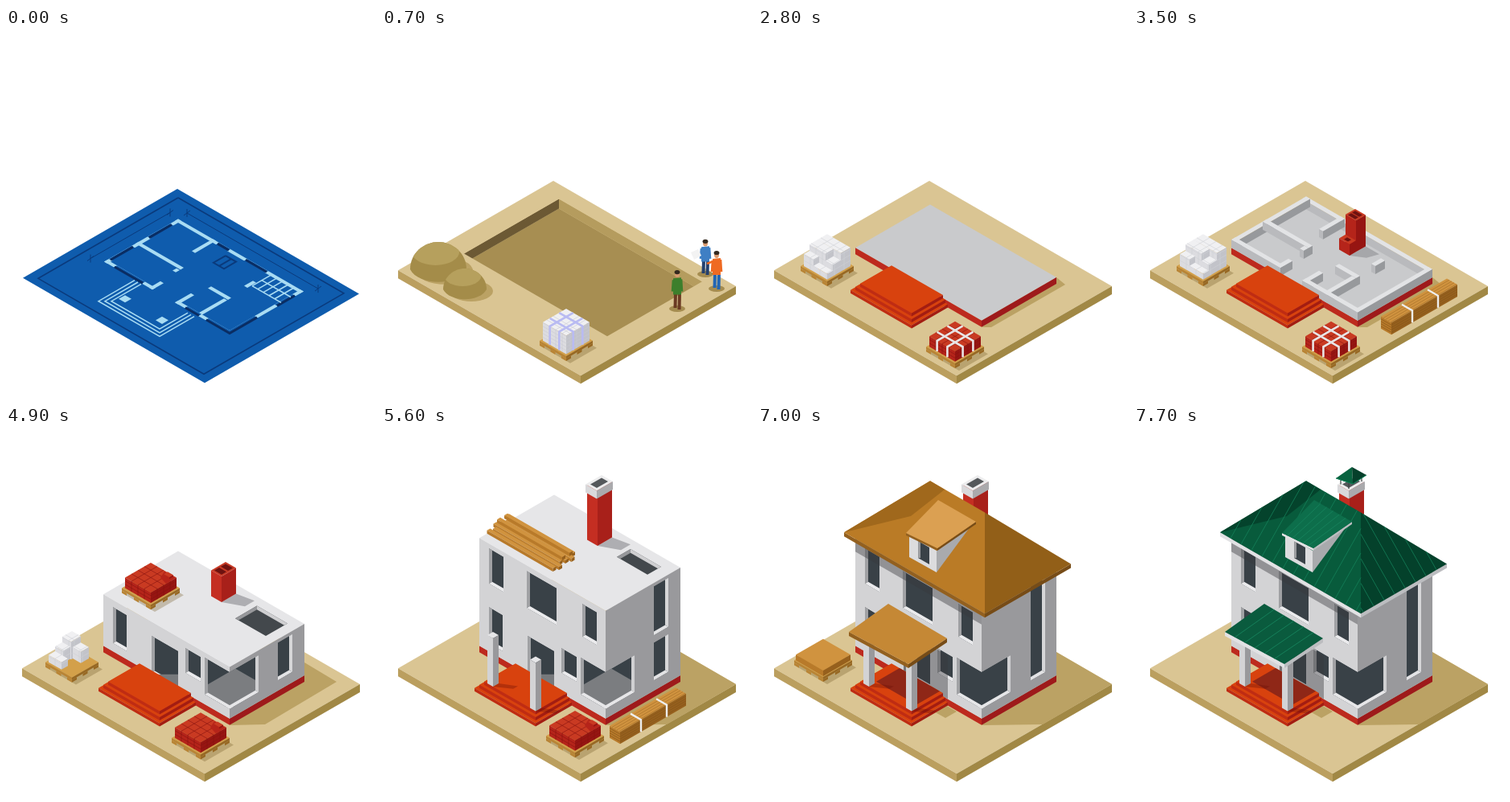
These frames come from a looping animation (460x460 px, 8 s). An HTML page with a canvas:

```html
<!DOCTYPE html>
<html lang="en">
<head>
<meta charset="utf-8">
<title>House construction</title>
<style>
html, body { margin: 0; width: 100%; height: 100%; overflow: hidden; background: #fff; }
canvas { display: block; width: 460px; height: 460px; }
</style>
</head>
<body>
<canvas id="stage" width="460" height="460"></canvas>
<script>
const ctx = document.getElementById('stage').getContext('2d');
const SLOPE = 0.577;

// Isometric point: x runs right-down, y runs left-down, z runs up.
const P = (x, y, z = 0) => [213 + x - y, 190 + (x + y) * SLOPE - z];

// Each palette is [top, left face, right face].
const EARTH = ['#dac593', '#bb9f5f', '#a18845'];
const WHITE = ['#e6e6e8', '#d3d3d5', '#99999c'];
const LOW = ['#e2e3e5', '#b9babd', '#97999c'];
const RED = ['#c93a22', '#b5241a', '#961512'];
const STEP = ['#d8420e', '#bf2c13', '#a31d12'];
const WOOD = ['#d0933f', '#b87a2a', '#96601d'];
const PALLET = ['#d3a04a', '#b98434', '#976823'];
const BRICK = ['#f0f0f2', '#dcdce0', '#c2c3c9'];
const GLASS = '#394147', SHADE = '#bba264';

function trace(pts) {
  ctx.beginPath();
  pts.forEach(p => ctx.lineTo(...p));
}
function poly(color, ...pts) {
  trace(pts);
  ctx.closePath();
  ctx.fillStyle = color;
  ctx.fill();
}
function line(color, width, ...pts) {
  trace(pts);
  ctx.strokeStyle = color;
  ctx.lineWidth = width;
  ctx.stroke();
}
function oval(color, x, y, rx, ry) {
  ctx.beginPath();
  ctx.ellipse(x, y, rx, ry, 0, 0, 7);
  ctx.fillStyle = color;
  ctx.fill();
}
const rect = (color, x0, y0, x1, y1, z = 0) =>
  poly(color, P(x0, y0, z), P(x1, y0, z), P(x1, y1, z), P(x0, y1, z));
const leftFace = (color, x0, x1, y, z0, z1) =>
  poly(color, P(x0, y, z0), P(x1, y, z0), P(x1, y, z1), P(x0, y, z1));
const rightFace = (color, x, y0, y1, z0, z1) =>
  poly(color, P(x, y0, z0), P(x, y1, z0), P(x, y1, z1), P(x, y0, z1));

function box(x0, y0, z0, x1, y1, z1, [top, left, right]) {
  rect(top, x0, y0, x1, y1, z1);
  leftFace(left, x0, x1, y1, z0, z1);
  rightFace(right, x1, y0, y1, z0, z1);
}

// Site
function ground() {
  box(0, 0, -10, 227, 193, 0, EARTH);
}
const lowShadow = () => poly(SHADE, [278, 372], [322, 371], [411, 318], [371, 294]);
const tallShadow = () => poly(SHADE, [278, 372], [354, 371], P(227, 0), [371, 281]);

// Goods
function pallet(x, y, z, s) {
  poly('rgba(110,85,30,.3)', P(x, y, z), P(x + s + 5, y, z), P(x + s + 5, y + s, z), P(x, y + s, z));
  box(x, y, z + 3, x + s, y + s, z + 6, PALLET);
  for (let i = 0; i < 3; i++) {
    const a = i * (s - 6) / 2;
    leftFace(PALLET[1], x + a, x + a + 6, y + s, z, z + 3);
    rightFace(PALLET[2], x + s, y + a, y + a + 6, z, z + 3);
  }
}
function courses(x0, y0, z0, x1, y1, z1, color, gap) {
  for (let z = z0 + gap; z < z1; z += gap) line(color, 0.6, P(x0, y1, z), P(x1, y1, z), P(x1, y0, z));
  for (let x = x0 + 8; x < x1; x += 8) line(color, 0.6, P(x, y0, z1), P(x, y1, z1), P(x, y1, z0));
  for (let y = y0 + 8; y < y1; y += 8) line(color, 0.6, P(x0, y, z1), P(x1, y, z1), P(x1, y, z0));
}
function load(x, y, z, s, h, colors, joint, strap) {
  pallet(x, y, z, s);
  const x0 = x + 2, y0 = y + 2, x1 = x + s - 2, y1 = y + s - 2, z0 = z + 6, z1 = z0 + h;
  box(x0, y0, z0, x1, y1, z1, colors);
  courses(x0, y0, z0, x1, y1, z1, joint, 4.5);
  if (!strap) return;
  for (const f of [0.3, 0.7]) {
    const a = x0 + (x1 - x0) * f, b = y0 + (y1 - y0) * f;
    line(strap, 2.6, P(a, y0, z1), P(a, y1, z1), P(a, y1, z0));
    line(strap, 2.6, P(x0, b, z1), P(x1, b, z1), P(x1, b, z0));
  }
}
const redLoad = (x, y, z, s, strap) => load(x, y, z, s, 13, RED, '#861410', strap && '#e9e4e4');
function openRed(x, y, z) {
  redLoad(x, y, z, 36);
  poly(RED[1], P(x + 20, y + 3, z + 19), P(x + 34, y + 3, z + 19), P(x + 34, y + 15, z + 19), P(x + 24, y + 12, z + 19));
  box(x + 24, y + 3, z + 19, x + 31, y + 8, z + 21, RED);
}
const whiteLoad = (x, y, strap) => load(x, y, 0, 33, 23, BRICK, '#c9cad3', strap);
function usedWhite(x, y, many) {
  pallet(x, y, 0, 33);
  const stacks = many
    ? [[2, 2, 31, 14, 29], [2, 14, 22, 24, 29], [22, 14, 31, 24, 20], [2, 24, 14, 31, 21], [14, 24, 31, 31, 13]]
    : [[2, 2, 13, 14, 28], [13, 2, 23, 12, 20], [2, 14, 12, 23, 21], [2, 23, 18, 31, 15]];
  for (const [a, b, c, d, h] of stacks) {
    box(x + a, y + b, 6, x + c, y + d, h, BRICK);
    courses(x + a, y + b, 6, x + c, y + d, h, '#cfd0d6', 7);
  }
}
function timber(y) {
  box(208, y, 2, 221, y + 82, 17, WOOD);
  for (let z = 5; z < 17; z += 3) line('#85551a', 0.7, P(208, y + 82, z), P(221, y + 82, z), P(221, y, z));
  for (let x = 211; x < 221; x += 3) line('#a9712a', 0.7, P(x, y, 17), P(x, y + 82, 17));
  for (const b of [24, 56]) line('#eee', 2.4, P(208, y + b, 17), P(221, y + b, 17), P(221, y + b, 2));
}
function beams() {
  for (let i = 0; i < 6; i++) {
    const shift = (i * 5) % 7, y = 84 + i * 5.5;
    box(29 + shift, y, 142, 111 + shift, y + 4, 146, WOOD);
  }
  for (const y of [88, 97]) box(31, y, 146, 112, y + 4, 150, WOOD);
}

// Earthworks
function heap(x, y, rx, h) {
  oval(SHADE, x + 8, y + 2, rx, rx * 0.48);
  ctx.beginPath();
  ctx.moveTo(x - rx, y);
  ctx.bezierCurveTo(x - rx, y - h * 0.6, x - rx * 0.5, y - h, x, y - h);
  ctx.bezierCurveTo(x + rx * 0.5, y - h, x + rx, y - h * 0.6, x + rx, y);
  ctx.bezierCurveTo(x + rx * 0.7, y + rx * 0.6, x - rx * 0.7, y + rx * 0.6, x - rx, y);
  ctx.fillStyle = '#a48c49';
  ctx.fill();
  ctx.save();
  ctx.clip();
  oval('#b6a05d', x - rx * 0.1, y - h * 0.65, rx * 0.85, h * 0.5);
  ctx.restore();
}
function man(x, y, shirt, legs, h = 46) {
  oval('#a58c50', x, y - 3, 10, 4);
  line(legs, 4, [x - 2, y - h * 0.45], [x - 2.5, y - 4]);
  line(legs, 4, [x + 3, y - h * 0.45], [x + 2.5, y - 2]);
  poly(shirt, [x - 5, y - h * 0.8], [x + 5, y - h * 0.82], [x + 5, y - h * 0.4], [x - 5, y - h * 0.4]);
  line(shirt, 2.6, [x - 5, y - h * 0.76], [x - 6, y - h * 0.48]);
  line(shirt, 2.6, [x + 5, y - h * 0.78], [x + 6, y - h * 0.48]);
  oval('#d99a70', x, y - h * 0.9, 3, 4);
  oval('#34291f', x, y - h * 0.95, 3.4, 2.6);
}
function pit(floor, bricks) {
  ground();
  ctx.save();
  trace([P(23, 16), P(201, 16), P(201, 134), P(23, 134)]);
  ctx.clip();
  rect(floor, 23, 16, 201, 134, -12);
  leftFace('#b59c5e', 23, 201, 16, -12, 0);
  rightFace('#6c5934', 23, 16, 134, -12, 0);
  ctx.restore();
  heap(70, 300, 35, 34);
  heap(103, 325, 27, 26);
  if (bricks) redLoad(112, 151, 0, 33.5, true);
  whiteLoad(169, 153, '#b9bbf2');
  man(402, 309, '#3f7fc4', '#24406e');
  poly('#f3f3f3', [384, 279], [393, 275], [397, 283], [388, 288]);
  man(416, 327, '#ef6a22', '#2265b4', 50);
  line('#ef6a22', 2.5, [412, 290], [404, 293]);
  man(367, 352, '#3d7f2c', '#6b3a23', 51);
}

// Floor plan shared by the blueprint and the walls, listed back to front.
const WALLS = [
  [33, 32, 190, 37], [33, 32, 38, 125], [76, 32, 81, 59], [33, 81, 90, 86], [85, 86, 90, 92],
  [33, 120, 94, 125], [89, 110, 94, 125], [146, 52, 151, 64], [126, 84, 152, 89],
  [121, 104, 126, 125], [147, 89, 152, 125], [185, 32, 190, 125], [121, 120, 190, 125]
];
function blueprint() {
  const z = -10, blue = '#0f5cad', navy = '#0a3a7c', pale = '#a9dcf3';
  const frame = (x0, y0, x1, y1) => [P(x0, y0, z), P(x1, y0, z), P(x1, y1, z), P(x0, y1, z), P(x0, y0, z)];
  rect(blue, 0, 0, 226, 192, z);
  line(navy, 1.6, ...frame(10, 9, 216, 183));
  line(navy, 1, P(21, 30, z), P(21, 129, z));
  line(navy, 1, P(32, 20, z), P(195, 20, z));
  for (const [x, y] of [[21, 30], [21, 129], [32, 20], [195, 20]]) {
    const [a, b] = P(x, y, z);
    line(navy, 1, [a, b - 5], [a, b + 5]);
    line(navy, 1, [a - 4, b + 3], [a + 4, b - 3]);
  }
  for (const w of WALLS) rect(pale, w[0], w[1], w[2] - 1, w[3] - 1, z);
  for (const w of [[33, 90, 38, 118], [33, 42, 38, 70], [84, 32, 98, 37], [119, 32, 145, 37],
    [45, 120, 80, 125], [133, 120, 150, 125], [159, 120, 190, 125], [185, 89, 190, 125], [185, 42, 190, 64]])
    rect(blue, ...w, z);
  const dark = (...p) => line('#0a2d63', 3, ...p);
  dark(P(35, 90, z), P(35, 118, z));
  dark(P(35, 42, z), P(35, 70, z));
  dark(P(84, 34, z), P(98, 34, z));
  dark(P(119, 34, z), P(145, 34, z));
  dark(P(45, 123, z), P(80, 123, z));
  dark(P(133, 123, z), P(150, 123, z));
  dark(P(159, 123, z), P(188, 123, z), P(188, 89, z));
  dark(P(188, 42, z), P(188, 64, z));
  line(navy, 2, ...frame(102, 42, 115, 57));
  line(navy, 2, P(109, 42, z), P(109, 57, z));
  for (let x = 151; x < 186; x += 7) line(pale, 1.6, P(x, 35, z), P(x, 58, z));
  line(pale, 1.6, P(151, 46, z), P(187, 46, z));
  line(pale, 1.6, P(151, 58, z), P(187, 58, z));
  for (const d of [0, 4, 8])
    line(pale, 1.5, P(72 + d, 125, z), P(72 + d, 170 - d, z), P(148 - d, 170 - d, z), P(148 - d, 127, z));
  rect(pale, 82, 147, 90, 155, z);
  rect(pale, 128, 147, 136, 155, z);
}

// House parts
function base() {
  box(33, 32, 0, 190, 125, 8, ['#c9cacc', '#bd2a1e', '#9e1a1b']);
}
function porchSteps(shaded) {
  for (let i = 0; i < 3; i++)
    box(72 + 3 * i, 125, 4 * i, 148 - 3 * i, 170 - 3 * i, 4 * i + 4, STEP);
  if (shaded) rect('#8f2717', 88, 125, 138, 154, 12);
}
function columns(top) {
  for (const x of [82, 135]) {
    poly('rgba(110,15,5,.35)', P(x + 7, 157, 12), P(x + 22, 148, 12), P(x + 22, 154, 12), P(x + 7, 164, 12));
    box(x, 157, 12, x + 7, 164, top, WHITE);
  }
}
function storey(top) {
  base();
  for (const [x0, y0, x1, y1] of WALLS)
    box(x0, y0, 8, x1, y1, top, top > 30 ? WHITE : LOW);
}

// A recessed opening; `at` maps (along, depth, height) to the wall.
function opening(at, a0, a1, z0, z1, jamb, sill) {
  const d = 4;
  ctx.save();
  trace([at(a0, 0, z0), at(a1, 0, z0), at(a1, 0, z1), at(a0, 0, z1)]);
  ctx.clip();
  poly(GLASS, at(a0, 0, z0), at(a1, 0, z0), at(a1, 0, z1), at(a0, 0, z1));
  poly(jamb, at(a0, 0, z0), at(a0, d, z0), at(a0, d, z1), at(a0, 0, z1));
  poly(sill, at(a0, 0, z0), at(a1, 0, z0), at(a1, d, z0), at(a0, d, z0));
  ctx.restore();
}
const winL = (...a) => opening((x, d, z) => P(x, 125 - d, z), ...a, '#a0a1a4', '#ebebed');
const winR = (...a) => opening((y, d, z) => P(190 - d, y, z), ...a, '#d6d6d8', '#e3e3e5');

function cornerWindow(open) {
  ctx.save();
  trace([P(159, 125, 66), P(190, 125, 66), P(190, 89, 66), P(190, 89, 20), P(190, 125, 20), P(159, 125, 20)]);
  ctx.clip();
  ctx.fillStyle = GLASS;
  ctx.fill();
  if (open) rect('#7b7d80', 150, 78, 190, 125, 20);
  rightFace('#a0a1a4', 159, 121, 125, 20, 66);
  leftFace('#d0d0d2', 186, 190, 89, 20, 66);
  rect('#e6e6e8', 159, 121, 190, 125, 20);
  rect('#e6e6e8', 186, 89, 190, 125, 20);
  ctx.restore();
}
function windows(upper, open, tall) {
  winL(45, 62, 18, 63);
  winL(93, 126, 9, 55);
  if (open) poly('#77797c', P(98, 125, 10), P(126, 125, 10), P(126, 125, 26));
  winL(135, 154, 33, 64);
  cornerWindow(open);
  if (upper) {
    winL(45, 63, 92, 136);
    winL(92, 129, 89, 135);
    winL(161, 179, 93, 134);
  }
  if (tall) winR(46, 64, 20, 140);
  else {
    winR(47, 65, 21, 68);
    if (upper) winR(47, 65, 77, 138);
  }
}
function body(top, open, tall) {
  base();
  box(33, 32, 8, 190, 125, top, WHITE);
  windows(top > 100, open, tall);
}
function hatch(x0, y0, x1, y1, z) {
  rect('#43484c', x0, y0, x1, y1, z);
  poly('#cfcfd1', P(x0, y0, z), P(x1, y0, z), P(x1, y0 + 4, z), P(x0 + 4, y0 + 4, z));
  poly('#97989b', P(x0, y0, z), P(x0 + 4, y0 + 4, z), P(x0 + 4, y1, z), P(x0, y1, z));
}
function chimney(z0, z1, capped) {
  poly('rgba(90,90,95,.4)', P(115, 42, z0), P(134, 38, z0), P(134, 50, z0), P(115, 60, z0));
  box(102, 42, z0, 115, 60, z1, ['#c63a26', '#c42e22', '#a8201a']);
  if (capped) {
    box(101, 41, z1 - 10, 115, 61, z1, ['#ededee', '#d9d9db', '#aaaaad']);
    rect('#55585b', 104, 44, 112, 58, z1);
  } else {
    rect('#6e1210', 104, 44, 113, 50, z1);
    rect('#6e1210', 104, 52, 113, 58, z1);
  }
}
function hearth() {
  poly('#a6a7aa', P(115, 40, 8), P(132, 40, 8), P(128, 52, 8), P(115, 60, 8));
  box(102, 40, 8, 115, 52, 47, RED);
  rect('#6e1210', 104, 42, 113, 46, 47);
  rect('#6e1210', 104, 47, 113, 51, 47);
  box(102, 52, 8, 115, 60, 22, RED);
  rect('#6e1210', 106, 54, 111, 58, 22);
}
function chimneyHood() {
  for (const [x, y] of [[103, 43], [103, 59], [113, 59], [113, 43]])
    line('#3d4543', 1.2, P(x, y, 211), P(x, y, 218));
  poly('#08633f', [251, 65], [271, 51], [272, 72]);
  poly('#05402b', [271, 51], [289, 61], [272, 72]);
  line('#0b8054', 1, [251, 65], [272, 72], [289, 61]);
}

// Hip roof over the rectangle X0..X1, Y0..Y1
const X0 = 26, X1 = 201, Y0 = 25, Y1 = 132, EAVE = 149, RIDGE = 213;
const RUN = (Y1 - Y0) / 2, MID = Y0 + RUN;
const hipRise = (v, lo, hi) => Math.min(1, (v - lo) / RUN, (hi - v) / RUN);
const ridgeA = P(X0 + RUN, MID, RIDGE), ridgeB = P(X1 - RUN, MID, RIDGE);
const eaveL = P(X0, Y1, EAVE), eaveF = P(X1, Y1, EAVE), eaveR = P(X1, Y0, EAVE);

function slopes(color, width, step) {
  const climb = t => EAVE + (RIDGE - EAVE) * t;
  for (let x = X0 + step; x < X1; x += step) {
    const t = hipRise(x, X0, X1);
    line(color, width, P(x, Y1, EAVE), P(x, Y1 - RUN * t, climb(t)));
  }
  for (let y = Y0 + step; y < Y1; y += step) {
    const t = hipRise(y, Y0, Y1);
    line(color, width, P(X1, y, EAVE), P(X1 - RUN * t, y, climb(t)));
  }
}
function roof(c) {
  leftFace('rgba(55,55,60,.42)', 33, 190, 125, 125, 142);
  leftFace(c.edge[0], X0, X1, Y1, EAVE - 5, EAVE);
  rightFace(c.edge[1], X1, Y0, Y1, EAVE - 5, EAVE);
  poly(c.left, eaveL, ridgeA, ridgeB, eaveF);
  poly(c.dark, eaveL, ridgeA, [232, 79], [190, 112]);
  poly(c.right, ridgeB, eaveR, eaveF);
  if (c.seam) slopes(c.seam, 0.8, 13);
  dormer(c);
}
// Light panel with seams parallel to its sides and a trim below.
function panel(c, color, left, top, right, front, trim) {
  const drop = ([x, y]) => [x, y + trim];
  poly(c.edge[0], left, front, drop(front), drop(left));
  poly(c.edge[1], front, right, drop(right), drop(front));
  poly(color, left, top, right, front);
  if (!c.seam) return;
  const mix = (a, b, f) => [a[0] + (b[0] - a[0]) * f, a[1] + (b[1] - a[1]) * f];
  for (let f = 1 / 6; f < 0.99; f += 1 / 6)
    line(c.seam, 1, mix(left, front, f), mix(top, right, f));
}
function dormer(c) {
  poly('#dcdcde', [188, 135], [222, 155], [222, 182], [188, 163]);
  poly('#a9aaad', [222, 155], [264, 125], [222, 182]);
  poly(GLASS, [199, 143], [213, 151], [213, 172], [199, 164]);
  poly('#9a9b9e', [199, 143], [202, 145], [202, 164], [199, 164]);
  panel(c, c.light, [184, 133], [224, 92], [271, 119], [223, 152], 3);
}
function porch(c) {
  columns(74);
  panel(c, c.porch, [113, 256], [162, 221], [235, 264], [187, 296], 5);
}
const TIMBER = {
  left: '#ba7b26', right: '#925f18', dark: '#a0681c', light: '#dba052', porch: '#c58835',
  edge: ['#93601f', '#774c17']
};
const GREEN = {
  left: '#085b3c', right: '#04412b', dark: '#04432c', light: '#0d6e4b', porch: '#0a5b3e',
  edge: ['#e2e2e4', '#bcbdc0'], seam: '#15805a'
};

function rafters() {
  slopes('#bb7d2d', 3, 13);
  line('#94601f', 4, eaveL, ridgeA, ridgeB, eaveF);
  line('#94601f', 4, ridgeB, eaveR);
  line('#cf9341', 4, eaveL, eaveF, eaveR);
  columns(72);
  line('#cf9341', 3.5, [113, 257], [162, 223], [235, 265], [188, 297], [113, 257]);
  for (let f = 0.2; f < 0.9; f += 0.2)
    line('#b87a2a', 3, [113 + 75 * f, 257 + 40 * f], [162 + 73 * f, 223 + 42 * f]);
}
function finished(c) {
  ground();
  tallShadow();
  body(142, false, true);
  leftFace('rgba(55,55,60,.42)', 93, 148, 125, 8, 62);
  rect(SHADE, 148, 126, 160, 140);
  porchSteps(true);
  chimney(142, 211, true);
  roof(c);
  porch(c);
}
function slabSite() {
  ground();
  poly(SHADE, [278, 372], [290, 372], [382, 319], [371, 310]);
}

const STAGES = [
  blueprint,
  () => pit('#a78e52', false),
  () => pit('#a78e52', true),
  () => pit('#f06c39', true),
  () => {
    slabSite(); base(); porchSteps();
    usedWhite(17, 144, true); redLoad(182, 150, 0, 36, true);
  },
  () => {
    slabSite(); storey(18); hearth(); porchSteps();
    usedWhite(17, 144, true); redLoad(182, 150, 0, 36, true); timber(32);
  },
  () => {
    ground(); lowShadow(); storey(72); windows(false, true); porchSteps();
    usedWhite(13, 144, true); redLoad(173, 144, 0, 36, true);
  },
  () => {
    ground(); lowShadow(); body(72, true); hatch(141, 42, 179, 69, 72);
    chimney(72, 104); openRed(43, 76, 72); porchSteps();
    usedWhite(13, 144, false); openRed(173, 144, 0);
  },
  () => {
    ground(); tallShadow(); body(142, true); hatch(139, 43, 177, 60, 142);
    chimney(142, 211, true); beams(); porchSteps(); columns(72);
    openRed(170, 143, 0); timber(56);
  },
  () => {
    ground(); tallShadow(); body(142, true); chimney(142, 211, true);
    porchSteps(); rafters(); timber(56);
  },
  () => {
    finished(TIMBER);
    pallet(9, 141, 0, 36);
    box(10, 142, 6, 44, 176, 13, WOOD);
  },
  () => { finished(GREEN); chimneyHood(); }
];

const LOOP = 8000, HOLD = 700;
function frame(now) {
  const stage = Math.floor((now % LOOP) / HOLD);
  ctx.fillStyle = '#fff';
  ctx.fillRect(0, 0, 460, 460);
  STAGES[stage]();
  requestAnimationFrame(frame);
}
frame(performance.now());
</script>
</body>
</html>
```
